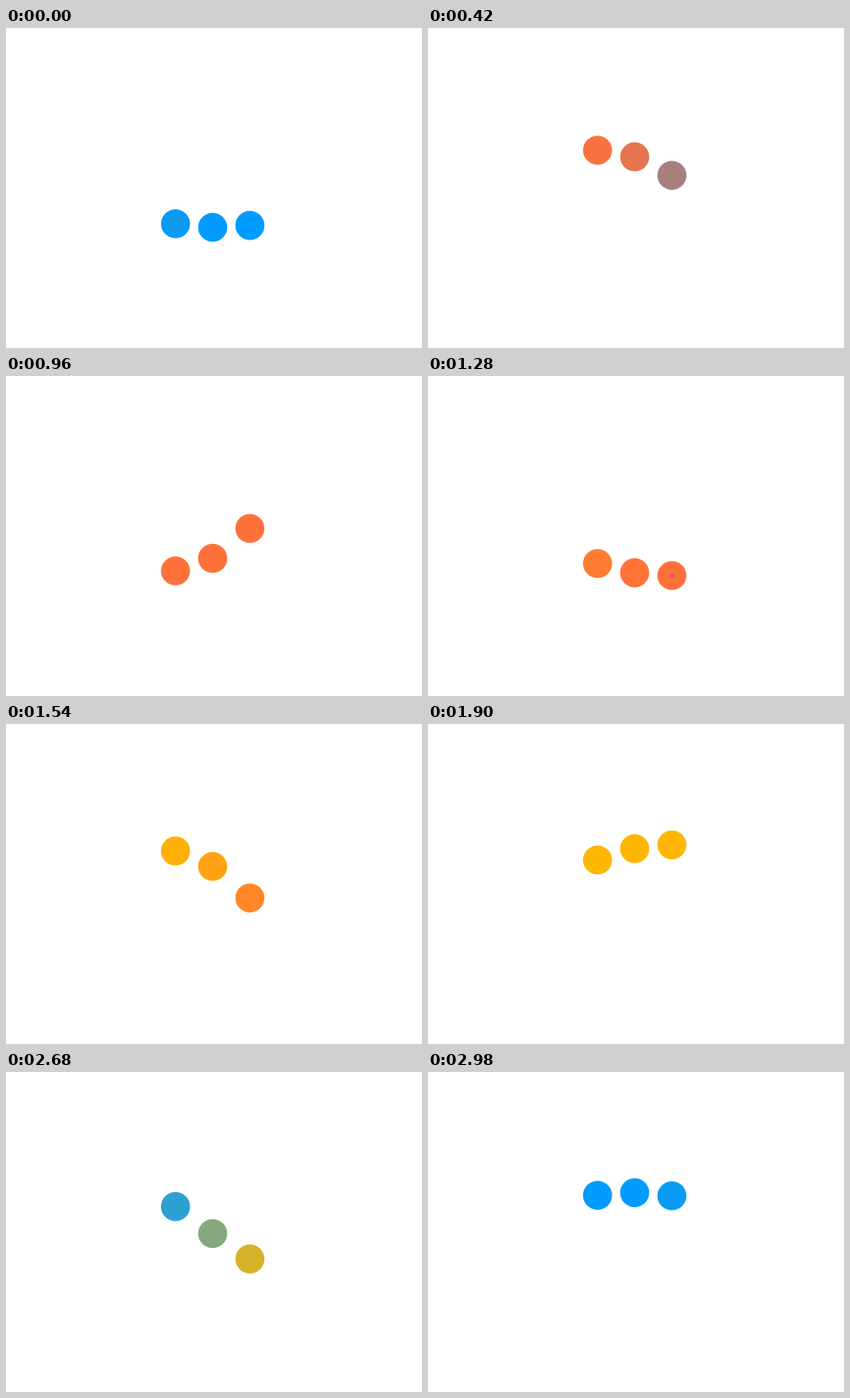
An HTML page with a canvas for the animation above (3000 ms loop, 467 px wide and 360 px high).

```html
<!DOCTYPE html>
<html lang="en">
<head>
<meta charset="utf-8">
<title>Bouncing dots</title>
<style>
  html, body { margin: 0; width: 100%; height: 100%; overflow: hidden; background: #fff; }
  canvas { display: block; width: 467px; height: 360px; }
</style>
</head>
<body>
<canvas id="stage" width="467" height="360"></canvas>
<script>
const ctx = document.getElementById('stage').getContext('2d');
const LOOP = 3000, STEP = 20, HALF = 600;
const TOP = 135.8, BOTTOM = 224.5, RADIUS = 16.3;
const COLORS = [[0, 155, 255], [255, 113, 59], [255, 182, 2]];
const DOTS = [
  { x: 190.3, delay: -114 },
  { x: 232, delay: -16 },
  { x: 273.8, delay: 82 }
];

const bezier = (a, b, t) => 3 * t * (1 - t) ** 2 * a + 3 * t * t * (1 - t) * b + t ** 3;

// cubic-bezier(.65, .05, .35, .95), solved by bisection
function ease(x) {
  let lo = 0, hi = 1;
  for (let i = 0; i < 24; i++) {
    const mid = (lo + hi) / 2;
    if (bezier(0.65, 0.35, mid) < x) lo = mid; else hi = mid;
  }
  return bezier(0.05, 0.95, lo);
}

const mix = (a, b, k) => a + (b - a) * k;

function drawDot(dot, time) {
  const phase = (time - dot.delay) / HALF;
  const n = Math.floor(phase);
  const k = ease(phase - n);
  const rising = n % 2 === 0;
  const cycle = Math.floor(n / 2);
  const from = COLORS[(cycle + 3) % 3], to = COLORS[(cycle + 1) % 3];
  // the colour changes only on the way up
  const rgb = from.map((c, i) => Math.round(mix(c, to[i], rising ? k : 1)));
  const y = mix(BOTTOM, TOP, rising ? k : 1 - k);
  ctx.fillStyle = `rgb(${rgb})`;
  ctx.beginPath();
  ctx.arc(dot.x, y, RADIUS, 0, Math.PI * 2);
  ctx.fill();
}

function render(time) {
  ctx.fillStyle = '#fff';
  ctx.fillRect(0, 0, 467, 360);
  DOTS.forEach(dot => drawDot(dot, time));
}

const start = performance.now();
function tick() {
  const t = (performance.now() - start) % LOOP;
  render(Math.floor(t / STEP) * STEP);
  requestAnimationFrame(tick);
}
tick();
</script>
</body>
</html>
```
